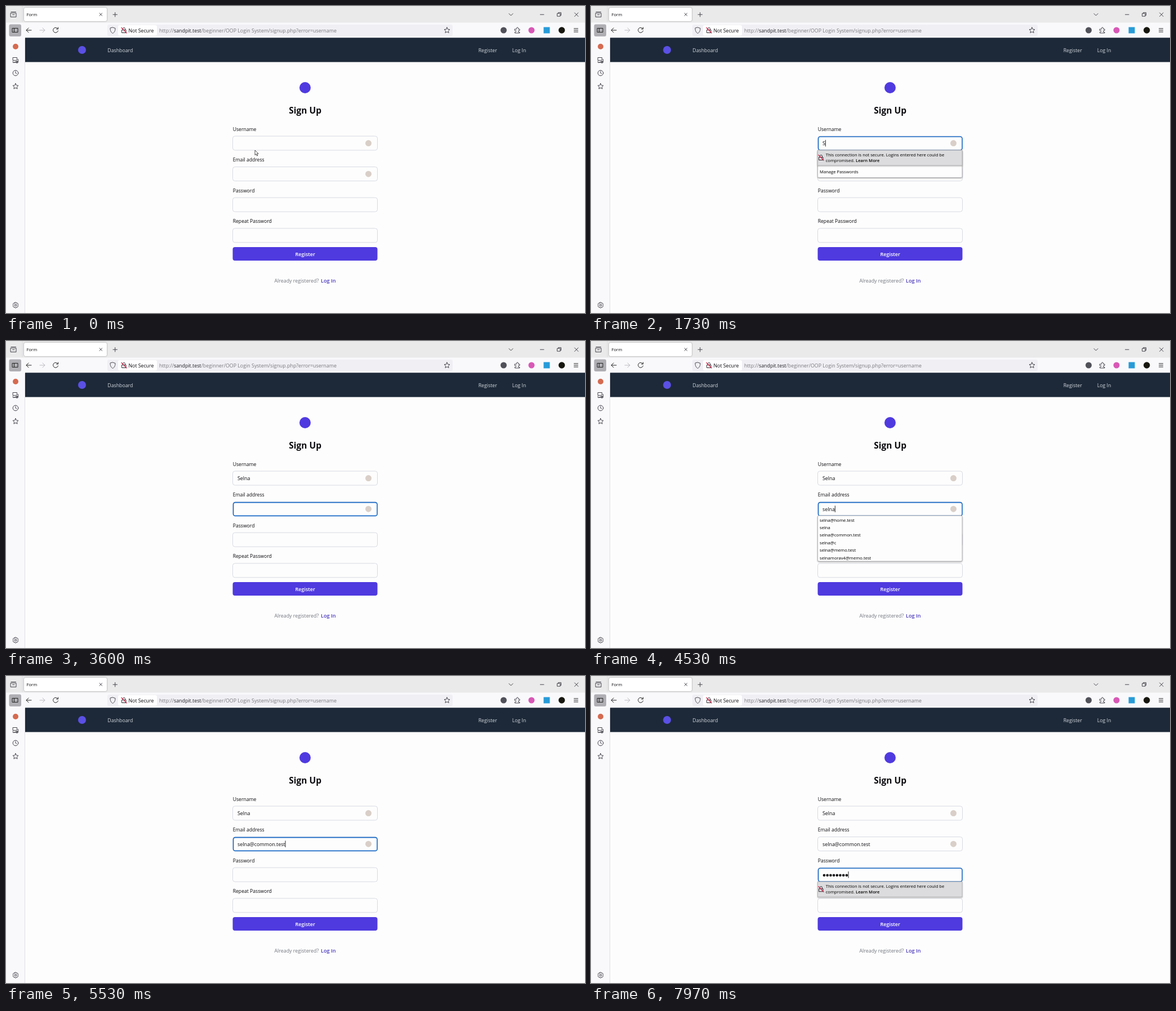
Recreate the animation shown at these times as an HTML page. Size 1028 px wide and 545 px high, loop 8 s.

```html
<!DOCTYPE html>
<html lang="en">
<head>
<meta charset="utf-8">
<title>Form</title>
<style>
  html, body { margin: 0; width: 100%; height: 100%; overflow: hidden; background: #fdfdfd; }
  svg { display: block; width: 100%; height: 100%; }
  text { font: 8.75px "Open Sans", "Noto Sans", sans-serif; fill: #0c0c10; white-space: pre; }
  .small { font-size: 7.65px; fill: #000; }
  .label { font-size: 8.65px; }
  .value { font-size: 8.9px; }
  .bold { font-weight: 600; }
  .nav { fill: #d3d8df; }
  .mid { text-anchor: middle; }
  .icon { fill: none; stroke: #45454c; stroke-width: 1; stroke-linecap: round; stroke-linejoin: round; }
  .field { fill: #fdfdfd; stroke: #d8dae2; }
  .focus { fill: #fdfdfd; stroke: #1a6ac6; stroke-width: 1.6; }
  .popup { fill: #fdfdfd; stroke: #b4b4b8; filter: drop-shadow(0 1px 1px #0005); }
  .warning { fill: #dcdcde; stroke: #b4b4b8; filter: drop-shadow(0 1px 1px #0004); }
  .badge { fill: #d9cfc8; }
</style>
</head>
<body>
<svg viewBox="0 0 1028 545">
  <defs>
    <path id="star" d="M0-5 1.5-1.7 5-1.3 2.4 1.1 3.1 4.6 0 2.8-3.1 4.6-2.4 1.1-5-1.3-1.5-1.7Z"/>
    <g id="lock" class="icon">
      <path stroke="#2b2b30" d="M-3.5-.5h7v5h-7zM-2-.5v-2a2 2 0 0 1 4 0v2"/>
      <path stroke="#d7264c" stroke-width="1.3" d="M-4.5-4.5 4.5 5"/>
    </g>
  </defs>

  <!-- Browser window -->
  <rect width="1028" height="545" fill="#f9f9fc"/>
  <rect width="1028" height="29.5" fill="#eaeaeb"/>
  <path d="M29 0v29" stroke="#dcdcdf"/>
  <rect x="32" y="3" width="147" height="24" rx="3" fill="#fff" style="filter:drop-shadow(0 0 1px #0006)"/>
  <text x="36.5" y="18" style="font-size:7.7px">Form</text>
  <rect x="5.5" y="32.5" width="21.5" height="21.5" rx="3" fill="#aeaeb3"/>
  <rect x="180" y="33" width="613" height="20.5" rx="3" fill="#f0f0f4"/>
  <rect x="199" y="34" width="69" height="18.5" rx="3" fill="#fff"/>
  <text x="217.5" y="46.7">Not Secure</text>
  <text x="272" y="46.7" style="font-size:8.85px;fill:#77777d">http://<tspan fill="#222227">sandpit.test</tspan>/beginner/OOP Login System/signup.php?error=username</text>
  <g class="icon">
    <path d="M8.5 12.5h9.5v7h-9.5zM9 10.5h8.5M11.5 15.5h3.5"/>
    <path d="m166 12.7 4.6 4.6m0-4.6-4.6 4.6M190 15.2h7.5M193.7 11.5v7.5M893 13.5l3.5 3.5 3.5-3.5"/>
    <path d="M948.5 15.2h6.5M979 13.2h5v5h-5zM980.5 13v-1.3h5v5h-1.3M1009.5 12l6.5 6.5m0-6.5-6.5 6.5"/>
    <path stroke="#222" d="M11.5 39.5h9.5v7h-9.5zM14.5 39.5v7"/>
    <path stroke="#222" d="M45 43h-9m4-4-4 4 4 4"/>
    <path stroke="#bbbbc0" d="M60 43h9m-4-4 4 4-4 4"/>
    <path stroke="#222" d="M92 40.5a4.5 4.5 0 1 0 .5 3.5M92.5 38v3h-3"/>
    <path d="m189.5 38 4.5 1.5c0 4-1 7-4.5 9-3.5-2-4.5-5-4.5-9z"/>
    <use href="#star" x="783" y="43"/>
    <path d="M903.5 41h3v-1.5a1.5 1.5 0 0 1 3 0V41h2.5v2.5h-1a1.5 1.5 0 0 0 0 3h1V48h-8.5v-2h1a1.3 1.3 0 0 0 0-2.6h-1z"/>
    <path stroke="#222" d="M1008.5 40h7m-7 3h7m-7 3h7"/>
    <path d="M12.5 91.5h7v5h-7zM15 99.5h6.5v-5M12.5 98v2.5h3M18 98.5h3v2.5h-3z"/>
    <circle cx="17" cy="119" r="4.8"/><path d="M17 116v3l2 1.2"/>
    <use href="#star" x="17" y="142.5"/>
    <circle cx="17" cy="531" r="1.7"/>
    <path d="m15.8 526.2h2.4l.5 1.4 1.7-.2 1.3 2.2-1 1.4 1 1.4-1.3 2.2-1.7-.2-.5 1.4h-2.4l-.5-1.4-1.7.2-1.3-2.2 1-1.4-1-1.4 1.3-2.2 1.7.2z"/>
  </g>
  <use href="#lock" x="209.5" y="43"/>
  <circle cx="883.5" cy="43" r="5.5" fill="#51515a"/>
  <circle cx="933" cy="43" r="5.5" fill="#d858b6"/>
  <rect x="954.5" y="37.5" width="11" height="11" fill="#279bd8"/>
  <circle cx="986.7" cy="43" r="5.7" fill="#17170f"/>
  <circle cx="17" cy="72" r="5" fill="#d56a50"/>

  <!-- Page -->
  <rect x="34" y="56.5" width="994" height="488.5" fill="#fdfdfd"/>
  <path d="M33.5 57v488" stroke="#dedee4"/>
  <rect x="34" y="56.3" width="994" height="43.2" fill="#1d2938"/>
  <circle cx="135" cy="78" r="7" fill="#5b50e4"/>
  <text class="nav" x="180.3" y="82">Dashboard</text>
  <text class="nav" x="838.7" y="82">Register</text>
  <text class="nav" x="898.7" y="82">Log In</text>
  <circle cx="531" cy="145" r="10" fill="#4f3ae0"/>
  <text class="mid" x="531.2" y="190.5" style="font-size:15.5px;font-weight:700">Sign Up</text>
  <g id="form"></g>
  <rect x="402.5" y="428" width="257" height="24" rx="4" fill="#4f3adf"/>
  <text class="mid bold" x="531.2" y="443.6" style="font-size:9px;fill:#fff">Register</text>
  <text x="476.5" y="491" style="font-size:8.85px;fill:#72767f">Already registered?</text>
  <text class="bold" x="559" y="491" style="font-size:9.1px;fill:#4938bd">Log In</text>

  <g id="live"></g>
  <path id="arrow" d="M0 0v8.6l2-1.8 1.5 3.2 1.5-.7-1.5-3.1h2.7z" fill="#fff" stroke="#222" stroke-width=".8"/>
  <path id="beam" class="icon" d="M-2-4h1.5l.5.5.5-.5H2M0-3.5v7M-2 4h1.5l.5-.5.5.5H2"/>
</svg>

<script>
const LOOP = 8000, BLINK = 500, ROW = 13.4, BULLET = 5.7;
const $ = id => document.getElementById(id);
const every = (start, gap, count) => Array.from({ length: count }, (_, i) => start + gap * i);

const fields = [
  { label: 'Username', y: 231, value: 'Selna', badge: true, focus: 150, clicked: 600,
    keys: [1560, 1740, 2000, 2160, 2330], popup: loginPopup },
  { label: 'Email address', y: 285.6, value: 'selna@common.test', badge: true, focus: 2950,
    keys: [...every(3700, 165, 5), ...every(4620, 72, 12)], popup: historyPopup },
  { label: 'Password', y: 340.2, value: '********', secret: true, focus: 5850,
    keys: every(6050, 240, 8), popup: warning },
  { label: 'Repeat Password', y: 394.8 }
];
const entries = ['selna@home.test', 'selna', 'selna@common.test', 'selna@c',
  'selna@memo.test', 'selnamorav4@memo.test'];

const text = (x, y, str, cls) => `<text x="${x}" y="${y}" class="${cls}">${str}</text>`;
const rect = (x, y, w, h, attrs) => `<rect x="${x}" y="${y}" width="${w}" height="${h}" ${attrs}/>`;
const circle = (x, y, r, attrs) => `<circle cx="${x}" cy="${y}" r="${r}" ${attrs}/>`;
const panel = (y, h) => rect(402.5, y, 256.5, h, 'rx="2" class="popup"');
const badge = f => f.badge ? circle(643.5, f.y + 12.6, 5.5, 'class="badge"') : '';

$('form').innerHTML = fields.map(f =>
  text(402.7, f.y - 9.5, f.label, 'label') +
  rect(402.5, f.y, 257, 25, 'rx="4" class="field"') + badge(f)).join('');

function warning(y) {
  return rect(402.5, y, 256.5, 27, 'class="warning"') +
    `<use href="#lock" x="408.5" y="${y + 13}"/>` +
    text(416.7, y + 10.8, 'This connection is not secure. Logins entered here could be', 'small') +
    text(416.7, y + 21.2, 'compromised. <tspan class="bold">Learn More</tspan>', 'small');
}

function loginPopup(y, typed) {
  const relay = typed ? '' : circle(416, y + 35, 5, 'fill="#9a30d8"') +
    text(430, y + 38, 'Use Tamarly Proxy email mask', 'small') +
    `<path d="M406 ${y + 44.5}h250" stroke="#dcdccf"/>`;
  return panel(y, typed ? 48.5 : 66) + warning(y) + relay +
    text(406, y + (typed ? 40.8 : 58.2), 'Manage Passwords', 'small');
}

function historyPopup(y, typed) {
  const rows = entries.filter(entry => typed && entry.startsWith(typed));
  if (!rows.length || rows.length === 1 && rows[0] === typed) return '';
  return panel(y - .5, rows.length * ROW + .5) +
    rows.map((row, i) => text(406, y + 10 + i * ROW, row, 'small')).join('');
}

// Typed text or bullets; the id lets the caret follow the rendered width.
function content({ y, secret }, typed) {
  if (!secret) return `<text id="v${y}" x="411" y="${y + 16.2}" class="value">${typed}</text>`;
  return [...typed].map((_, i) => circle(414 + i * BULLET, y + 13.6, 2.3, 'fill="#0c0c10"')).join('');
}

let shown = '';
function drawForm(t) {
  const used = fields.filter(f => f.focus <= t);
  const active = used.at(-1);
  const typedIn = f => f.value.slice(0, f.keys.filter(k => k <= t).length);
  let html = '', caretOn = false;

  for (const f of used) {
    if (f === active) html += rect(403.6, f.y + 1, 255.4, 23.8, 'rx="3.5" class="focus"') + badge(f);
    html += content(f, typedIn(f));
  }
  if (active) {
    html += active.popup(active.y + 25, typedIn(active));
    const inputs = [active.focus, active.clicked ?? 0, ...active.keys];
    const last = Math.max(...inputs.filter(k => k <= t));
    caretOn = Math.floor((t - last) / BLINK) % 2 === 0;
  }

  if (html + caretOn === shown) return;
  shown = html + caretOn;
  $('live').innerHTML = html;
  if (caretOn) {
    const width = active.secret ? typedIn(active).length * BULLET
      : $('v' + active.y).getComputedTextLength();
    $('live').insertAdjacentHTML('beforeend',
      rect(411 + width, active.y + 6.8, .9, 11.6, 'fill="#0c0c10"'));
  }
}

// The pointer slides into the field, then hides while typing.
function drawPointer(t) {
  const p = Math.min(1, Math.max(0, (t - 30) / 140));
  const inside = p > .6;
  for (const id of ['arrow', 'beam']) {
    $(id).setAttribute('transform', `translate(${442 + p} ${256 - 5 * p})`);
  }
  $('arrow').style.display = inside ? 'none' : '';
  $('beam').style.display = inside && t < fields[0].keys[0] ? '' : 'none';
}

const start = performance.now();
function tick() {
  const t = (performance.now() - start) % LOOP;
  drawForm(t);
  drawPointer(t);
  requestAnimationFrame(tick);
}
tick();
</script>
</body>
</html>
```
